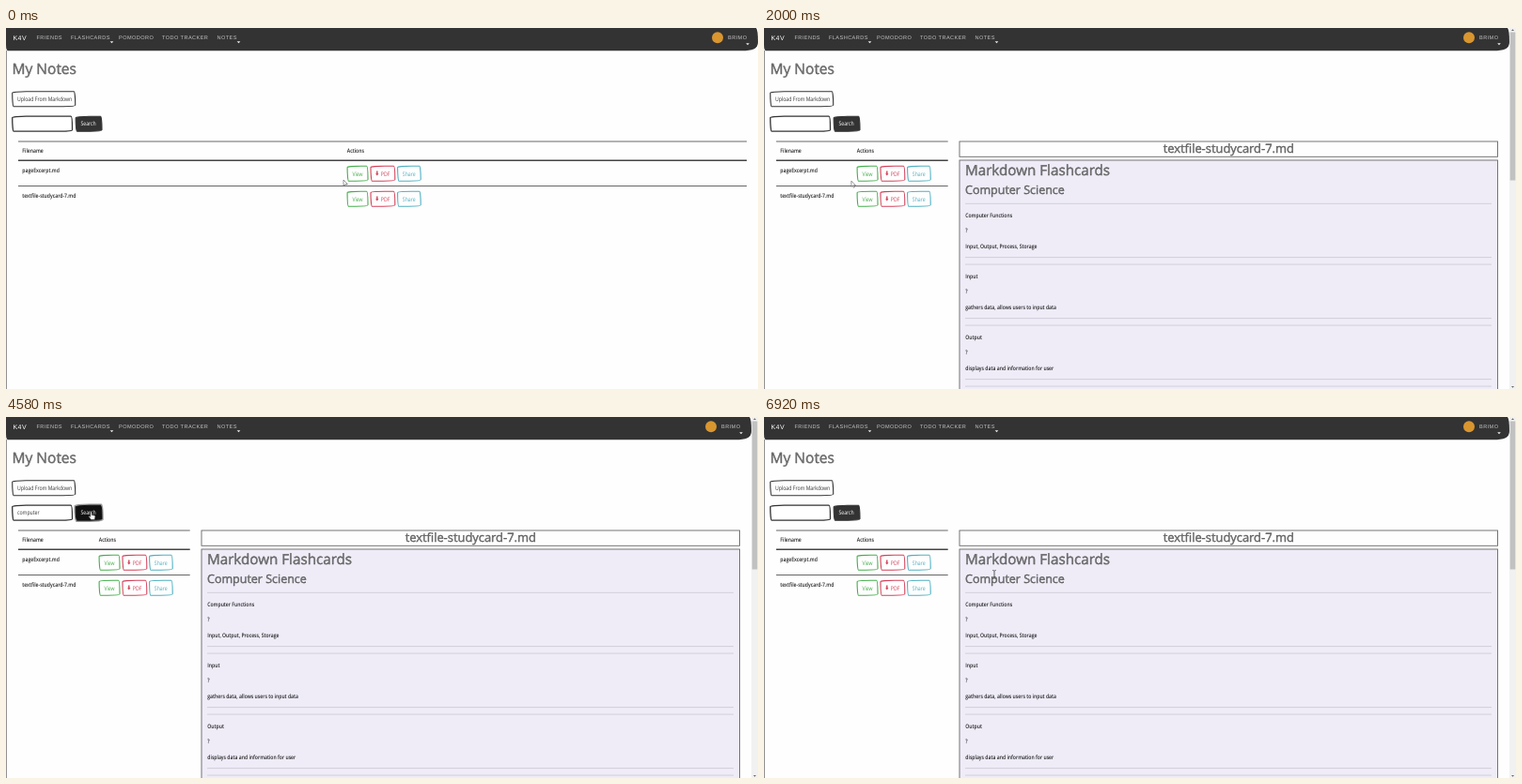
Animation, 800 px wide and 385 px high, one loop 7.01 s. Source, as an HTML page:

```html
<!DOCTYPE html>
<html lang="en">
<head>
<meta charset="utf-8">
<title>My Notes</title>
<style>
  html, body { margin: 0; width: 100%; height: 100%; overflow: hidden; background: #fefefe; }
  svg { display: block; width: 100%; height: 100%; }
  text { text-rendering: geometricPrecision; white-space: pre; }
  .hand { font: 400 6.3px "Open Sans", sans-serif; fill: #333; }
  .ink { font-size: 6.2px; font-weight: 600; fill: #222; }
  .sketch { font-family: "Open Sans", sans-serif; fill: #747474; stroke: #484848; stroke-width: .35; }
  .nav { font: 5.6px "Liberation Sans", Arial, sans-serif; letter-spacing: .42px; fill: #c4c4c4; }
  .brand { font-size: 7px; fill: #fff; }
  .plain { font: 5.2px Roboto, sans-serif; fill: #111; }
</style>
</head>
<body>
<svg id="stage" viewBox="0 0 800 385"></svg>
<script>
const LOOP = 7010;
const DARK = '#333', GREEN = '#45ae4c', RED = '#d4405a', TEAL = '#4fb0c0';
const FILES = ['pageExcerpt.md', 'textfile-studycard-7.md'];
const HISTORY = ['hum', 'heading', 'j', 'hello', 'no', 'rain'];
const QUERY = 'computer';
const OPEN_FIRST = 640, OPEN_SECOND = 1750, FOCUS = 2580, TYPE = 3160, KEY_GAP = 110,
      BLUR = 4500, RESULTS = 4630, REOPEN = 6460;

// Pointer path: time, x, y, shape
const PATH = [
  [0, 359, 162, 'arrow'], [80, 359, 162, 'arrow'], [330, 372, 156, 'hand'],
  [680, 372, 156, 'arrow'], [1060, 107.5, 180, 'hand'], [1830, 107.5, 180, 'arrow'],
  [2400, 40, 102, 'beam'], [2620, 40, 102, 'arrow'], [2860, 77, 128.5, 'arrow'],
  [4020, 77, 128.5, 'arrow'], [4400, 90.5, 101, 'hand'], [5000, 90.5, 101, 'arrow'],
  [5880, 368, 184, 'hand'], [6540, 368, 184, 'arrow'], [6700, 300, 174, 'beam'],
  [6880, 245, 168, 'beam'], [LOOP, 245, 168, 'beam']
];

const stage = document.getElementById('stage');
let pointer;

const rect = (x, y, w, h, fill, extra = '') =>
  `<rect x="${x}" y="${y}" width="${w}" height="${h}" fill="${fill}" ${extra}/>`;
const line = (x1, x2, y, color = '#555', width = .9) =>
  `<path d="M${x1} ${y}H${x2}" stroke="${color}" stroke-width="${width}"/>`;
const text = (x, y, s, cls, extra = '') => `<text x="${x}" y="${y}" class="${cls}" ${extra}>${s}</text>`;
// Condensed handwriting-like face
const hand = (x, y, s, cls = '', fill = '') =>
  `<text transform="translate(${x} ${y}) scale(.82 1)" class="hand ${cls}" ${fill && `style="fill:${fill}"`}>${s}</text>`;
const ink = (x, y, s) => hand(x, y, s, 'ink');
const heading = (x, y, s, size, extra = '') => text(x, y, s, 'sketch', `font-size="${size}" ${extra}`);

// Hand-drawn box: long shallow and short steep elliptical corners
function wobbly(x, y, w, h, stroke, fill = 'none', width = 1.1) {
  const f = Math.min(w / 280, h / 280, .417);
  const a = 255 * f, b = 25 * f, c = 225 * f;
  return `<path d="M${x + a} ${y}H${x + w - b}a${b} ${c} 0 0 1 ${b} ${c}V${y + h - b}` +
    `a${c} ${b} 0 0 1 ${-c} ${b}H${x + b}a${b} ${a} 0 0 1 ${-b} ${-a}V${y + b}a${a} ${b} 0 0 1 ${a} ${-b}z" ` +
    `fill="${fill}" stroke="${stroke}" stroke-width="${width}"/>`;
}

const over = (x, y, w, h) =>
  pointer.x >= x && pointer.x <= x + w && pointer.y >= y && pointer.y <= y + h;

function navbar(right) {
  const caret = (x, y) => `<path d="M${x - 1.8} ${y - .8}h3.6l-1.8 2z" fill="#eee"/>`;
  return `<path d="M0 0H${right - 2}q2 2 2 15 0 5-4 7.2-5 2-13 2H2Q0 24 0 18z" fill="${DARK}"/>` +
    text(7.5, 12.6, 'K4V', 'nav brand') +
    [[32.5, 'FRIENDS'], [69, 'FLASHCARDS'], [120, 'POMODORO'], [166, 'TODO TRACKER'], [224.5, 'NOTES'],
     [right - 32, 'BRIMO']].map(([x, s]) => text(x, 12.2, s, 'nav')).join('') +
    caret(112.5, 15) + caret(247.5, 15) + caret(right - 11, 17) +
    `<circle cx="${right - 43}" cy="10.3" r="6" fill="#d9962f"/>`;
}

function controls(dy, typed, focused, caretOn) {
  const y = 94 + dy, hot = over(74, y, 28, 16.5);
  return heading(6.5, 49.2 + dy, 'My Notes', 15.5) +
    wobbly(6.7, 67.8 + dy, 67, 16, DARK) + hand(12, 78 + dy, 'Upload From Markdown') +
    (focused ? wobbly(6, y - .5, 65, 17.2, '#bbb', 'none', 2.2) : '') +
    wobbly(6.7, y + .2, 63.8, 16, DARK, '#fff', 1.3) + hand(12, y + 10.4, typed) +
    (caretOn ? rect(11.8, y + 4.5, .6, 7.5, '#222') : '') +
    (hot ? wobbly(73.2, y - .8, 29.8, 18, '#999', 'none', 1.4) : '') +
    wobbly(74.2, y + .3, 27.8, 15.9, hot ? '#111' : DARK, hot ? '#111' : DARK) +
    hand(79.5, y + 10.4, 'Search', '', '#fff');
}

function actions(x, y) {
  const hot = over(x, y, 22, 16.5);
  return wobbly(x + .3, y + .2, 21.9, 16, GREEN, hot ? GREEN : 'none', hot ? 1.9 : 1.1) +
    hand(x + 5.6, y + 10.6, 'View', '', hot ? '#fff' : GREEN) +
    wobbly(x + 25.2, y + .2, 25.8, 16, RED) +
    `<path d="M${x + 31.3} ${y + 5.5}h1.4v2.8h1l-1.7 2.3-1.7-2.3h1z" fill="${RED}"/>` +
    hand(x + 36, y + 10.6, 'PDF', '', RED) +
    wobbly(x + 53.8, y + .2, 24.6, 16, TEAL) + hand(x + 59, y + 10.6, 'Share', '', TEAL);
}

function table(right, col, dy, files) {
  return line(13, right, 121 + dy) + ink(17.3, 133.2 + dy, 'Filename') + ink(col, 133.2 + dy, 'Actions') +
    line(13, right, 141.2 + dy, '#444', 1.4) +
    files.map((name, i) => {
      const y = 147 + dy + i * 27;
      return (i ? line(13, right, y - 5.5) : '') + ink(17.3, y + 7, name) + actions(col, y);
    }).join('');
}

function panel(x, right, bottom, title) {
  const frame = 'stroke="#666" stroke-width=".9"';
  return rect(x, 121, right - x, 16.3, '#fefefe', frame) +
    heading((x + right) / 2, 132.8, title, 12.9, 'text-anchor="middle"') +
    rect(x, 141, right - x, bottom - 141, '#efecf8', frame);
}

function firstNote() {
  const sizes = [[156.5, 15.2], [176.5, 12.4], [194, 10.8], [210.2, 9.3], [223.8, 7.7], [235.6, 6.2]];
  const phrase = 'This text is <tspan font-style="italic">really important</tspan>. ';
  const bullet = (y, s) => `<circle cx="227.7" cy="${y - 2}" r="1" fill="#222"/>` + ink(232.7, y, s);
  return panel(209.5, 787.8, 300, FILES[0]) +
    sizes.map(([y, size], i) => heading(216, y, `Heading level ${i + 1}`, size)).join('') +
    ink(216, 248.2, phrase.repeat(3)) +
    heading(216, 267, 'The quarterly results look great!', 9.7) +
    bullet(280.2, 'Revenue was off the chart.') +
    bullet(290.2, 'Profits were higher than ever. <tspan font-style="italic">Everything</tspan> is going according to plan.');
}

function secondNote() {
  const cards = [
    ['Computer Functions', 'Input, Output, Process, Storage'],
    ['Input', 'gathers data, allows users to input data'],
    ['Output', 'displays data and information for user']
  ];
  const rule = y => line(214, 774, y, '#cfccd6', .9);
  return panel(208, 780.5, 400, FILES[1]) +
    heading(214, 156.5, 'Markdown Flashcards', 15.2) + heading(214, 176.5, 'Computer Science', 12.5) +
    rule(187.3) +
    cards.map(([front, back], i) => {
      const y = 201.6 + i * 65;
      return ink(214.3, y, front) + ink(214.3, y + 16.5, '?') + ink(214.3, y + 33.3, back) +
        rule(y + 43) + rule(y + 50.5);
    }).join('');
}

function scrollbar() {
  return rect(793, 0, 7, 385, '#f1f1f1') + rect(793.7, 4.5, 5.6, 158, '#c1c1c1') +
    '<path d="M795 3l1.5-1.7L798 3zM795 382l1.5 1.7 1.5-1.7z" fill="#666"/>';
}

function suggestions() {
  return rect(6.5, 112, 81, 97.5, '#000', 'opacity=".12" rx="1"') +
    rect(6, 111, 80.3, 97, '#fff', 'stroke="#ccc" stroke-width=".5"') +
    HISTORY.map((s, i) => text(11.6, 123.6 + i * 15, s, 'plain', 'font-weight="500"')).join('');
}

function alertBox() {
  return wobbly(13, 34.3, 774.8, 20.6, '#b9dfe4', '#d3ebee', .8) +
    hand(25.3, 46.8, '1 search results found', 'ink', '#1d4850');
}

function statusBar() {
  return rect(0, 378.5, 64, 6.5, '#4bb8b5') +
    text(2, 384.4, 'workstead:8080/viewNote/4', 'plain');
}

function pointerAt(t) {
  const i = Math.max(1, PATH.findIndex(p => p[0] > t));
  const [t0, x0, y0, shape] = PATH[i - 1], [t1, x1, y1, next] = PATH[i];
  const k = (t - t0) / (t1 - t0), e = k * k * (3 - 2 * k);
  const moving = x0 !== x1 || y0 !== y1;
  return {
    x: x0 + (x1 - x0) * e, y: y0 + (y1 - y0) * e,
    shape: !moving ? PATH[i - 1][3] === 'arrow' && t0 > 0 && next === 'hand' ? 'hand' : restShape(i - 1) : k > .85 ? next : shape
  };
}

// While resting, keep the shape the pointer arrived with
function restShape(i) {
  return PATH[i][3];
}

function drawPointer() {
  const shapes = {
    arrow: '<path d="M0 0v6.2l1.5-1.3 1 2.2 1-.5-1-2.1h1.9z" fill="#fff" stroke="#555" stroke-width=".6"/>',
    hand: '<path d="M-.7.4q.8-1 1.5 0v3l3 .7q.7.3.6 1.2l-.6 3.3H0L-2.4 5.3q0-1 1-.6l.7.7z" fill="#fff" stroke="#333" stroke-width=".6"/>',
    beam: '<path d="M-1.7-4.5q1.4 0 1.7.8.3-.8 1.7-.8M0-3.7v7.4M-1.7 4.5q1.4 0 1.7-.8.3.8 1.7.8" fill="none" stroke="#333" stroke-width=".8"/>'
  };
  return `<g transform="translate(${pointer.x.toFixed(2)} ${pointer.y.toFixed(2)})">${shapes[pointer.shape]}</g>`;
}

function scene(t) {
  pointer = pointerAt(t);
  const view = t < OPEN_FIRST ? 'list' : t < OPEN_SECOND ? 'first'
    : t < RESULTS ? 'second' : t < REOPEN ? 'results' : 'second';
  const focused = t >= FOCUS && t < BLUR;
  const count = t < TYPE || t >= REOPEN ? 0 : Math.min(QUERY.length, Math.floor((t - TYPE) / KEY_GAP) + 1);
  const dy = view === 'results' ? 28.5 : 0;
  const [right, col] = { list: [788, 362.8], first: [197, 99.7], second: [195.7, 98.8], results: [788, 362.8] }[view];
  const onView = [147, 174].slice(0, view === 'results' ? 1 : 2).some(y => over(col, y + dy, 22, 16.5));

  return rect(0, 0, 800, 385, '#fefefe') + rect(0, 24, .8, 361, '#777') +
    navbar(view === 'second' ? 793 : 800) +
    (view === 'results' ? alertBox() : '') +
    controls(dy, QUERY.slice(0, count), focused, focused && !count) +
    table(right, col, dy, view === 'results' ? FILES.slice(1) : FILES) +
    (view === 'first' ? firstNote() : view === 'second' ? secondNote() + scrollbar() : '') +
    (focused && !count ? suggestions() : '') +
    (onView ? statusBar() : '') + drawPointer();
}

let shown = '';
function tick(now) {
  const markup = scene(now % LOOP);
  if (markup !== shown) stage.innerHTML = shown = markup;
  requestAnimationFrame(tick);
}
tick(performance.now());
</script>
</body>
</html>
```
